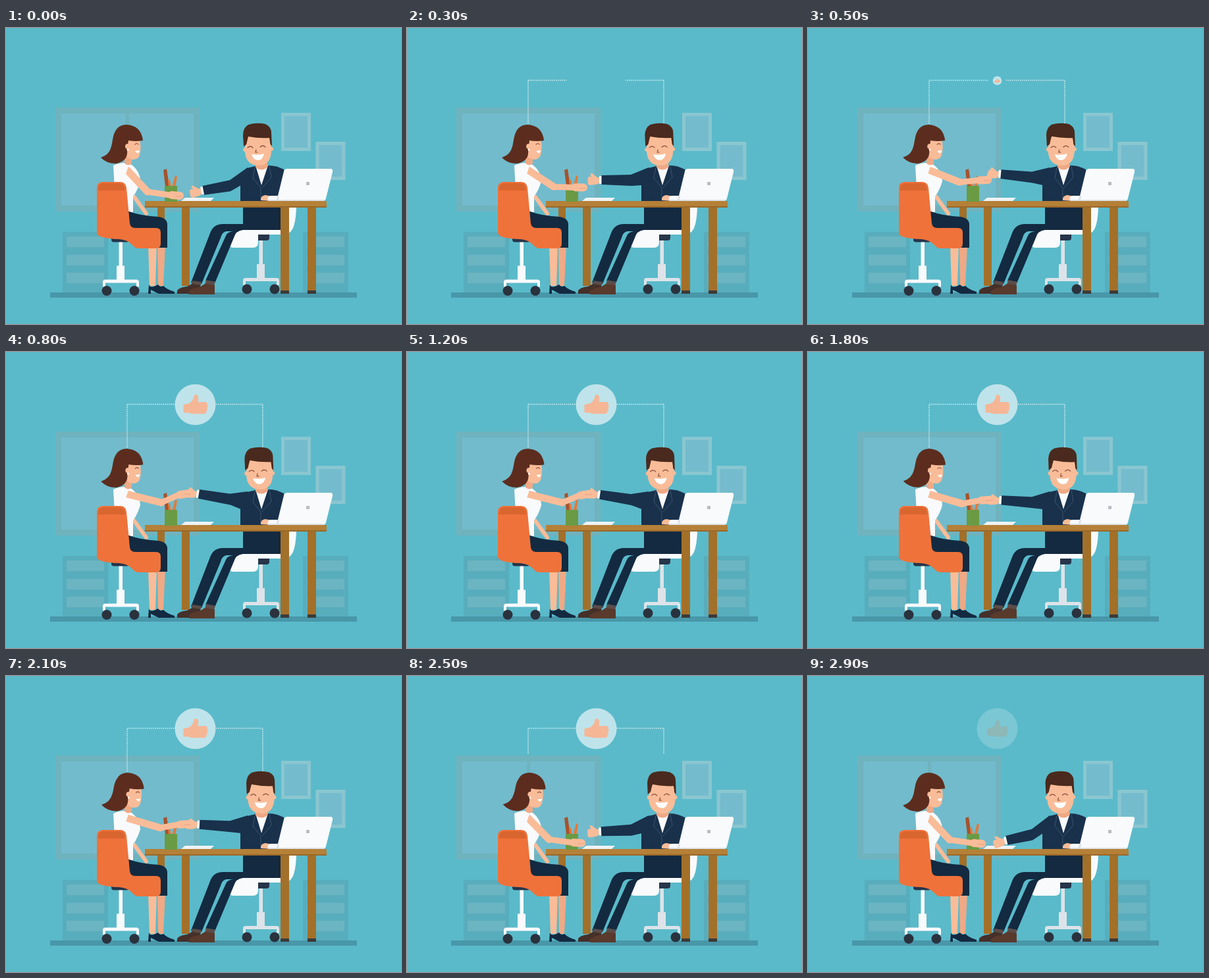
An HTML page for the animation above (3 s loop, 600 px wide and 450 px high).

```html
<!DOCTYPE html>
<html lang="en">
<head>
<meta charset="utf-8">
<title>Handshake over a desk</title>
<style>
  html, body { margin: 0; width: 100%; height: 100%; overflow: hidden; background: #5abaca; }
  svg { display: block; width: 100vw; height: 100vh; }
  .skin { fill: #f9bc98; }
  .skinLine { fill: none; stroke: #f9bc98; stroke-linecap: round; stroke-linejoin: round; }
  .shade { fill: #efa985; }
  .navy { fill: #19314b; }
  .dark { fill: #132a40; }
  .wood { fill: #a3702a; }
  .white { fill: #f9fafc; }
  .orange { fill: #ef723a; }
  .face { fill: none; stroke: #8b4e3c; stroke-width: 1.2; stroke-linecap: round; }
</style>
</head>
<body>
<svg viewBox="0 0 600 450">
  <defs>
    <g id="cabinet">
      <path fill="#58adbd" d="M0 0h69v92H0z"/>
      <path fill="#6bb4c1" d="M6 7h57v16H6zM6 35h57v16H6zM6 62h57v16H6z"/>
    </g>
    <g id="frame">
      <path fill="#74bccd" stroke="#8ac6d0" stroke-width="5" d="M2.5 2.5h40v53h-40z"/>
    </g>
    <g id="chairBase">
      <path d="M-2.500 -76h5.500v38h3v21h18q4 0 4 4v7h-4v-6h-47v6h-4v-7q0 -4 4 -4h17v-21h3.500z"/>
      <path fill="#26354a" d="M-14 -84h27v6q0 4 -4 4h-19q-4 0 -4 -4z"/>
      <g fill="#2a323e"><circle cx="-21" r="7.500"/><circle cx="21" r="7.500"/></g>
    </g>
  </defs>

  <!-- room -->
  <path fill="#72bbcc" stroke="#6fb3be" stroke-width="9" d="M79.500 125.500h210v149h-210z"/>
  <path id="divider" fill="#6fb3be" d="M182 129h5v142h-5z"/>
  <use href="#frame" x="418" y="129"/>
  <use href="#frame" x="470.500" y="173"/>
  <use href="#cabinet" x="86" y="310"/>
  <use href="#cabinet" x="451" y="310"/>
  <path fill="#4897a9" d="M67 402h466v8H67z"/>

  <!-- man -->
  <use href="#chairBase" x="387" y="397" fill="#dde3e8"/>
  <path class="white" d="M428 273h13q-1 24-6 33-4 8-18 8h-34v12q0 8-8 8h-30q-7 0-4-7l9-20h67z"/>
  <path class="dark" d="M417 262v45h-57q-11 1-14 12l-28 67-15-2 30-66q2-8 12-9h-10q-7 1-9 10l-29 70-16-2 29-75q5-14 19-14h31v-31z"/>
  <path class="navy" d="M379 210l-13 3q-10 8-10 22v30h62q10-20 4-50-11-6-23-6z"/>
  <path class="white" d="M379 209l9 30 10-30z"/>
  <path fill="none" stroke="#3b536c" d="M378 212l-3 16 12 15v18M400 210l3 17-14 16"/>
  <path class="shade" d="M379 202h18v10q-9 7-18 0z"/>
  <g id="manHead">
    <circle class="skin" cx="363" cy="185" r="3"/><circle class="skin" cx="403" cy="184" r="3"/>
    <path class="skin" d="M363 162h40v27q-2 20-19 20-19 0-21-20z"/>
    <path fill="#4a2a1e" d="M361 180l-1-17q0-11 8-16 13-4 26-1 9 4 9 13l1 20q-3-1-3-6l-1-6q-16 1-32-2l-2 8q0 5-5 7z"/>
    <path class="face" d="M367 182q4-4 8 0M386 181q4-4 8 0M380 185l-1 4h3"/>
    <path fill="#fff" d="M373 192q10 2 19-1-2 10-9 10t-10-9z"/>
  </g>

  <!-- desk legs and shoes -->
  <path class="wood" d="M230 272h11v30h-11zM267 272h12v120h-12zM417 272h13v131h-13zM458 272h13v131h-13z"/>
  <path fill="#3c3a38" d="M417 399h13v5h-13zM458 399h13v5h-13z"/>
  <path fill="#5b4c49" d="M283 384l14 2-2 8h-15zM304 383l14 3-3 8h-14z"/>
  <path fill="#45302a" d="M260 404v-5q4-5 15-6l8-4 12 2v13z"/>
  <path fill="#5a3a2c" d="M278 405v-5q5-5 16-6l8-5 15 2v14z"/>

  <!-- woman -->
  <use href="#chairBase" x="174" y="399.500" class="white"/>
  <path class="shade" d="M230 330h12l-3 62h-8z"/>
  <path class="skin" d="M216 330h13l-2 62h-9z"/>
  <path class="dark" d="M217 390q2 6 10 2l4-2q3 5 8 2 6 6 17 9v3h-24l-12-6v6h-4z"/>
  <path class="skinLine" stroke-width="6" d="M195 257l18 25"/>
  <path class="white" d="M163 209q8-4 17-4l11 3q13 10 13 25-4 14-11 23v24h-26z"/>
  <path class="dark" d="M184 278q22 8 48 9 13 2 13 12v35h-14l-45-20z"/>
  <path class="orange" d="M138 243q0-9 10-9h25q9 0 10 9l5 54q1 7 8 7h32q7 0 7 7v17q0 7-7 7h-26q-6 0-10-5-7-8-20-9-34-1-34-10z"/>
  <path fill="#d9652f" d="M140 247q-1-11 9-11h22q8 0 9 6l1 5z"/>

  <!-- desk top -->
  <path fill="#b58037" d="M211 263h276v10H211z"/>
  <path fill="#99682a" d="M211 271h276v2H211z"/>
  <path fill="#eef3f6" d="M272 258h44l-5 5h-45z"/>
  <path fill="#a5532d" d="M239 216l5-2 4 27h-6z"/>
  <path fill="#e2793a" d="M246 230l3 1 2 11h-4zM257 224l3 2-3 17h-5z"/>
  <path fill="#6a9a44" d="M241 240h19v24h-19z"/>

  <!-- laptop -->
  <path class="skin" d="M387 262q-1-7 7-8l10 2v7z"/>
  <path class="white" d="M427 214h66q4 0 3 5l-10 40q-1 4-5 4h-83q-2-8 5-8h10l9-37q1-4 5-4z"/>
  <path fill="#dce2e7" d="M398 261h85v2h-85zM412 255h3l-1 6h-3z"/>
  <path fill="#b9bec4" d="M456 234h5v5h-5z"/>

  <!-- woman's head -->
  <path class="shade" d="M180 194h11v12q-6 5-11 0z"/>
  <g id="womanHead">
    <path class="skin" d="M182 168h21q3 15 0 25-2 7-10 7-10-1-11-9z"/>
    <path fill="#5c2d1e" d="M208 171q-11 2-22 0l-2 14q2 17-16 21-14 1-24-9 13-4 16-17c2-7 2-15 5-21q5-12 18-12 22 1 25 24z"/>
    <circle class="skin" cx="185" cy="180" r="4"/><circle cx="185" cy="185" r="1.500" fill="#fff"/>
    <path class="face" d="M196 177q3-3 5 0"/>
    <path fill="#fff" d="M196 187l7-1q-1 5-4 4z"/>
  </g>

  <!-- moving arms -->
  <path id="manHand" class="skinLine" stroke-width="8"/>
  <path id="manThumb" class="skinLine" stroke-width="4"/>
  <path id="cuff" stroke="#fff" stroke-width="4" fill="none"/>
  <path id="sleeve" class="navy"/>
  <path id="womanUpper" class="skinLine" stroke-width="11"/>
  <path id="womanFore" class="skinLine" stroke-width="9"/>
  <path id="womanHand" class="skinLine" stroke-width="12"/>
  <path id="womanFinger" fill="none" stroke="#e9a381" stroke-width="1"/>
  <path class="white" d="M174 206q9 0 12 4l-5 15-5 5q-8-10-8-20z"/>

  <!-- approval badge -->
  <path id="dots" fill="none" stroke="#d9eff2" stroke-width="1.500" stroke-dasharray="1.500 1.500"/>
  <g id="badge">
    <circle r="31" fill="#bfe3ea"/>
    <path id="thumb" fill="#f5b696" d="M-18 0l9-2q6-4 7-11 1-3 4-2 4 2 2 11h12q3 1 2 4 2 2 0 5 1 3-1 5 0 4-4 4H-5q-5-2-13-2z"/>
  </g>
</svg>
<script>
const LOOP = 3000, STEP = 100;
const $ = id => document.getElementById(id);
const set = (id, name, value) => $(id).setAttribute(name, value);
const clamp = v => Math.max(0, Math.min(1, v));
const ramp = (t, a, b) => clamp((t - a) / (b - a));
const ease = u => u * u * (3 - 2 * u);

// Eased value of keys [time, v1, v2, ...] at time t.
function pose(t, keys) {
  let i = 0;
  while (i < keys.length - 2 && t >= keys[i + 1][0]) i++;
  const a = keys[i], b = keys[i + 1], u = ease(ramp(t, a[0], b[0]));
  return a.slice(1).map((v, k) => v + (b[k + 1] - v) * u);
}

const WOMAN_HAND = [[0, 261, 255], [100, 260, 254], [500, 270, 231], [700, 273, 222], [2100, 273, 225], [2500, 262, 254], [3000, 261, 255]];
const MAN_HAND = [[0, 288, 249], [500, 281, 221], [700, 281, 221], [2100, 282, 225], [2500, 283, 237], [2850, 291, 254], [3000, 288, 249]];
const MAN_HEAD = [[0, 0], [500, 2], [1200, 3], [1800, 5], [2500, 5], [3000, 0]];
const WOMAN_HEAD = [[0, 0], [1200, .5], [1800, 1], [2500, 2.5], [3000, 0]];

function drawWomanArm(x, y) {
  const k = clamp((255 - y) / 33), ex = 215 + 21 * k, ey = 249 - 20 * k;
  const dy = (y - ey) * .15;
  set("womanUpper", "d", `M184 216L${ex} ${ey}`);
  set("womanFore", "d", `M${ex} ${ey}L${x - 6} ${y}`);
  set("womanHand", "d", `M${x - 9} ${y - dy}L${x + 3} ${y}`);
  set("womanFinger", "d", `M${x - 3} ${y + 1}h10`);
}

function drawManArm(x, y, grip) {
  const ex = 340, ey = 227 + .45 * (y - 222);
  const len = Math.hypot(ex - x, ey - y), ux = (ex - x) / len, uy = (ey - y) / len;
  const at = (along, across) => `${x + ux * along - uy * across} ${y + uy * along + ux * across}`;
  set("manHand", "d", `M${at(6, 0)}L${at(-5 + 2 * grip, -1)}M${at(4, 3)}L${at(-5, 4)}`);
  set("manThumb", "d", `M${at(3, -3)}L${at(-3 + grip, -8 + 2 * grip)}`);
  set("cuff", "d", `M${at(10.5, -6)}L${at(10.5, 6)}`);
  set("sleeve", "d", `M${at(12, -7)}L${ex} ${ey - 8}L367 212L370 238L357 239L${ex + 1} ${ey + 9}L${at(12, 7)}z`);
}

// Dotted trail from a head to the badge, between two lengths; mirrored for the other side.
function drawTrail(from, to) {
  const rise = 66;
  const point = d => d < rise ? [184, 145 - d] : [184 + d - rise, 79.5];
  const points = [point(from), ...(from < rise && to > rise ? [[184, 79.5]] : []), point(to)];
  const path = map => "M" + points.map(map).join("L");
  set("dots", "d", to > from ? path(p => p.join(" ")) + path(([x, y]) => `${574 - x} ${y}`) : "");
}

function draw(t) {
  const fade = ramp(t, 500, 700) * (1 - ramp(t, 1400, 1800));
  const shake = -7 * Math.cos((t - 1200) / 400 * 2 * Math.PI) * fade;
  const [wx, wy] = pose(t, WOMAN_HAND), [mx, my] = pose(t, MAN_HAND);
  drawWomanArm(wx, wy + shake);
  drawManArm(mx, my + shake, ramp(t, 300, 600) * (1 - ramp(t, 2100, 2400)));

  const [manLean] = pose(t, MAN_HEAD), [womanLean] = pose(t, WOMAN_HEAD);
  set("manHead", "transform", `translate(${manLean * .8}) rotate(${manLean * .25} 385 210)`);
  set("womanHead", "transform", `translate(${womanLean * .5}) rotate(${womanLean} 186 205)`);
  set("divider", "opacity", t < 300 || t >= 2300 ? 1 : 0);

  const grown = 155 * (1 - (1 - ramp(t, 50, 500)) ** 2);
  const gone = 138 * ramp(t, 2400, 2900);
  drawTrail(gone, Math.min(grown, t < 2400 ? 155 : 138));

  const size = t < 500 ? ramp(t, 400, 500) * .22 : .22 + .78 * Math.sin(ramp(t, 500, 700) * Math.PI / 2);
  const left = 1 - ramp(t, 2700, 3000);
  set("badge", "transform", `translate(287.5 80) scale(${size})`);
  set("badge", "opacity", left);
  set("thumb", "transform", `scale(${.8 + .2 * left})`);
}

function tick(now) {
  draw(Math.floor(now % LOOP / STEP) * STEP);
  requestAnimationFrame(tick);
}
draw(0);
requestAnimationFrame(tick);
</script>
</body>
</html>
```
